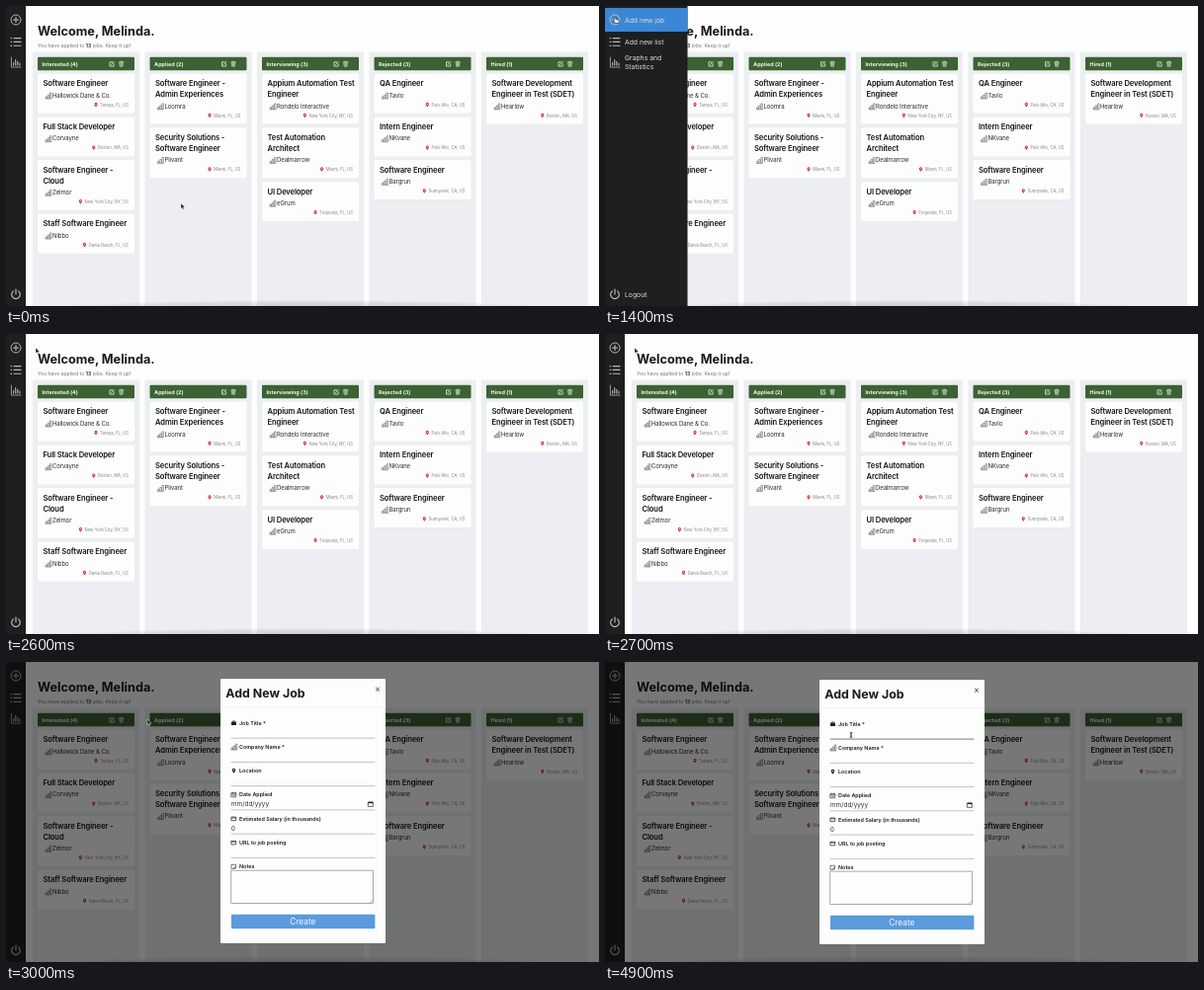
Animation of 600x304 px, one loop 5 s. Source, as an HTML page:

```html
<!DOCTYPE html>
<html lang="en">
<head>
<meta charset="utf-8">
<title>Job board</title>
<style>
  html, body { margin: 0; width: 100%; height: 100%; overflow: hidden; background: #fdfdfd; }
  svg { display: block; }
  text { font-family: Inter, "Open Sans", sans-serif; }
  .title { font-size: 7.6px; font-weight: 600; letter-spacing: -.015em; fill: #151515; }
  .firm { font-size: 6px; letter-spacing: -.015em; fill: #2b2b2b; }
  .place { font-size: 4.2px; fill: #858585; text-anchor: end; }
  .list { font-size: 5.45px; font-weight: 700; fill: #f4f7f3; }
  .menu { font-size: 6.8px; fill: #dedede; }
  .label { font-size: 5.4px; font-weight: 600; fill: #1c1c1c; }
  .line { fill: none; stroke-linecap: round; stroke-linejoin: round; }
</style>
</head>
<body>
<svg id="stage" width="600" height="304" viewBox="0 0 600 304"></svg>
<script>
const LOOP = 5000, STEP = 100;
const SIDE_SHUT = 20, SIDE_OPEN = 83.5;

const lists = [
  ["Interested (4)", [
    [["Software Engineer"], "Hallowick Dane & Co.", "Tampa, FL, US"],
    [["Full Stack Developer"], "Corvayne", "Boston, MA, US"],
    [["Software Engineer -", "Cloud"], "Zelmor", "New York City, NY, US"],
    [["Staff Software Engineer"], "Nibbo", "Dania Beach, FL, US"]]],
  ["Applied (2)", [
    [["Software Engineer -", "Admin Experiences"], "Loomra", "Miami, FL, US"],
    [["Security Solutions -", "Software Engineer"], "Plivant", "Miami, FL, US"]]],
  ["Interviewing (3)", [
    [["Appium Automation Test", "Engineer"], "Rondelo Interactive", "New York City, NY, US"],
    [["Test Automation", "Architect"], "Dealmarrow", "Miami, FL, US"],
    [["UI Developer"], "eGrum", "Tequesta, FL, US"]]],
  ["Rejected (3)", [
    [["QA Engineer"], "Tavlo", "Palo Alto, CA, US"],
    [["Intern Engineer"], "NKvane", "Palo Alto, CA, US"],
    [["Software Engineer"], "Bargrun", "Sunnyvale, CA, US"]]],
  ["Hired (1)", [
    [["Software Development", "Engineer in Test (SDET)"], "Hearlow", "Boston, MA, US"]]]
];

const esc = s => s.replace(/&/g, "&amp;");
const text = (x, y, s, attrs) => `<text x="${x}" y="${y}" ${attrs}>${s}</text>`;
const rect = (x, y, w, h, fill, attrs = "") =>
  `<rect x="${x}" y="${y}" width="${w}" height="${h}" fill="${fill}" ${attrs}/>`;
const line = (d, stroke, width, attrs = "") =>
  `<path class="line" d="${d}" stroke="${stroke}" stroke-width="${width}" ${attrs}/>`;
const at = (x, y, body, attrs = "") => `<g transform="translate(${x} ${y})" ${attrs}>${body}</g>`;

const bars = (x, y, color) => at(x, y,
  line("M0 6V4.2H1.5V6ZM2.2 6V2.3H3.7V6ZM4.4 6V.3H5.9V6Z", color, .55));
const pin = (x, y, color, size = 1) => at(x, y,
  `<path transform="scale(${size})" fill="${color}" fill-rule="evenodd"
    d="M0 4.4C-1 3-1.6 2.3-1.6 1.5a1.6 1.6 0 0 1 3.2 0C1.6 2.3 1 3 0 4.4ZM0 .9a.6.6 0 1 0 0 1.2a.6.6 0 0 0 0-1.2"/>`);

function card(x, y, [titles, firm, place]) {
  const extra = (titles.length - 1) * 10.9;
  return rect(x, y, 98, 40 + extra, "#fdfdfd", 'rx="2"') +
    titles.map((s, i) => text(x + 5.5, y + 12.7 + i * 10.9, s, 'class="title"')).join("") +
    bars(x + 8, y + 19 + extra, "#555") +
    text(x + 15, y + 24 + extra, esc(firm), 'class="firm"') +
    text(x + 92, y + 32.9 + extra, place, 'class="place"');
}

function column([name, cards], i) {
  const x = 27 + i * 113.5;
  let y = 68.7;
  const body = cards.map(c => {
    const out = card(x + 5, y, c);
    y += 43.7 + (c[0].length - 1) * 10.9;
    return out;
  }).join("");
  return rect(x, 46.5, 108, 258, "#eceef1") +
    rect(x + 5, 51.7, 98, 13.5, "#3c6233", 'rx="1"') +
    text(x + 9.6, 60.6, name, 'class="list"') +
    line("M3 .8H.4V5H4.6V2.6M2 3.4L4.8.4", "#e8eee6", .8, `transform="translate(${x + 77.6} 56)"`) +
    line("M0 1H4.6M1.6 .9V.2H3V.9M.6 1.2L.9 5.2H3.7L4 1.2M1.8 2.3V4.1M2.8 2.3V4.1", "#e8eee6", .65,
      `transform="translate(${x + 87.3} 56)"`) + body;
}

const side = rect(0, 0, 84, 304, "#1f1f1f") + rect(0, 2, 84, 24, "#3b87d6", 'id="hover"') +
  `<circle cx="10" cy="14" r="5" fill="none" stroke="#c4c4c4" stroke-width=".9"/>` +
  line("M7.4 14H12.6M10 11.4V16.6", "#c4c4c4", 1) +
  line("M8 32.6H15M8 36.4H15M8 40.2H15", "#b8b8b8", 1.1) +
  line("M5.2 32.6h.4M5.2 36.4h.4M5.2 40.2h.4", "#b8b8b8", 1.4) +
  line("M5.4 52V62H15", "#b8b8b8", .8) +
  line("M7.6 57.5V60M9.7 54.5V60M11.8 56.3V60M13.9 58V60", "#b8b8b8", 1.1) +
  line("M7.4 288.9A4.3 4.3 0 1 0 12.6 288.9M10 287V292", "#c4c4c4", 1.1) +
  [["Add new job", 16.5], ["Add new list", 38.8], ["Graphs and", 54.8],
   ["Statistics", 64.4], ["Logout", 294.6]]
    .map(([s, y]) => text(20, y, s, 'class="menu"')).join("");

// Form icons share a 5 x 5 box.
const ink = "#222";
const cardIcon = line("M.3 .8H4.7V4.4H.3ZM.3 1.7H4.7", ink, .7);
const icons = [
  rect(0, 1.3, 5, 3.4, ink, 'rx=".5"') + line("M1.6 1.2V.5H3.4V1.2", ink, .6),
  bars(0, -.8, "#444"),
  pin(2.5, .2, ink, 1.1),
  line("M.2 .7H4.8V4.9H.2ZM.2 1.9H4.8M1.3 0V.9M3.7 0V.9M1.4 3.3H3.6", ink, .6),
  cardIcon, cardIcon,
  line("M.4 .5H4.6V3.2L3.2 4.6H.4ZM4.6 3.2H3.2V4.6", ink, .6)
];
const fields = ["Job Title *", "Company Name *", "Location", "Date Applied",
  "Estimated Salary (in thousands)", "URL to job posting", "Notes"];

const modal = rect(0, 0, 167, 268, "#fdfdfd", 'rx="1"') +
  text(5.3, 19.1, "Add New Job", 'font-size="12.4" font-weight="700" fill="#1a1a1a"') +
  line("M157.4 9.1L160.6 12.3M160.6 9.1L157.4 12.3", "#333", .9) +
  line("M0 29H167", "#e2e2e2", .6) +
  fields.map((s, i) => {
    const y = 44.8 + i * 24.25;
    return at(11, y - 2.5, icons[i]) + text(19, y + 1.9, s, 'class="label"') +
      (i < 6 ? line(`M11 ${y + 15.4}H156`, "#a9a9a9", .7, i ? "" : 'id="under"') : "");
  }).join("") +
  text(11, 129.5, "mm/dd/yyyy", 'font-size="6.4" fill="#333"') +
  at(149.5, 124.4, line("M.2 .8H4.8V5H.2ZM1.3 0V.8M3.7 0V.8", "#222", .7) + rect(.2, .6, 4.6, 1.2, "#222")) +
  text(11, 153.8, "0", 'font-size="6" fill="#222"') +
  rect(10.8, 194.2, 143.8, 33.4, "#fdfdfd", 'stroke="#858585" stroke-width=".7"') +
  line("M151 226.6L153.7 223.9M152.7 226.6L153.7 225.6", "#777", .4) +
  rect(11, 238.8, 145.4, 14.6, "#5b9bdc", 'rx="1"') +
  text(83.3, 249, "Create", 'font-size="8.4" fill="#f5f9fd" text-anchor="middle"') +
  rect(11.2, 51.5, .6, 7.4, "#222", 'id="caret"');

const cursors =
  `<path id="arrow" d="M0 0V5.4L1.3 4.3L2.2 6.3L3.1 5.9L2.2 4H4Z" fill="#111" stroke="#fff" stroke-width=".4"/>` +
  `<path id="hand" d="M1 0Q1.8 0 1.8 .8V2.5L4.8 3.1Q5.3 3.3 5.2 4L4.7 6.4H1.7L-.4 3.8Q-.3 3 .3 3.5V.8Q.3 0 1 0Z"
    fill="#fff" stroke="#111" stroke-width=".6"/>` +
  line("M-1 -2.6Q0 -2.6 0 -2V2Q0 2.6-1 2.6M1 -2.6Q0 -2.6 0 -2V2Q0 2.6 1 2.6", "#222", .7, 'id="beam"');

stage.innerHTML = `
  <defs><radialGradient id="shade">
    <stop stop-color="#777" stop-opacity=".28"/><stop offset=".75" stop-color="#888" stop-opacity=".16"/>
    <stop offset="1" stop-color="#999" stop-opacity="0"/>
  </radialGradient></defs>` +
  rect(0, 0, 600, 304, "#fdfdfd") +
  text(32, 30, "Welcome, Melinda.", 'font-size="12.7" font-weight="700" fill="#191919"') +
  text(32, 41.6, 'You have applied to <tspan font-weight="700" fill="#333">13</tspan> jobs. Keep it up!',
    'font-size="5.1" fill="#777"') +
  lists.map(column).join("") +
  `<ellipse cx="300" cy="305" rx="240" ry="7" fill="url(#shade)"/>` +
  `<svg id="side" width="20" height="304" overflow="hidden">${side}</svg>` +
  rect(0, 0, 600, 304, "#000", 'id="dim"') +
  `<g id="modal">${modal}</g><g id="cursor">${cursors}</g>`;

const $ = id => document.getElementById(id);

// Pins sit just left of the right-aligned place names.
for (const el of stage.querySelectorAll(".place")) {
  const x = el.getAttribute("x") - el.getComputedTextLength() - 4.2;
  el.insertAdjacentHTML("afterend", pin(x, el.getAttribute("y") - 3.7, "#d3283c"));
}

// Pointer keys: time, x, y, shape.
const path = [
  [0, 177, 200, "arrow"], [100, 172, 191, "arrow"], [200, 172, 191, "arrow"],
  [300, 128, 152, "arrow"], [400, 94, 123, "arrow"], [600, 94, 123, "arrow"],
  [700, 45, 78, "hand"], [800, 45, 78, "hand"], [900, 16, 58, "hand"],
  [1400, 9, 11, "hand"], [1800, 9, 11, "hand"], [2000, 42, 19, "arrow"],
  [2100, 36, 8, "arrow"], [2200, 30, 14, "arrow"], [2800, 30, 14, "arrow"],
  [2900, 74, 13, "arrow"], [3000, 143, 58, "arrow"], [3300, 222, 68, "arrow"],
  [3500, 256, 71, "beam"], [3600, 256, 71, "beam"], [4000, 249, 74, "beam"],
  [LOOP, 249, 74, "beam"]
];

const clamp = v => Math.min(1, Math.max(0, v));
const smooth = v => (v = clamp(v), v * v * (3 - 2 * v));

function pointer(t) {
  const i = path.findIndex(k => k[0] > t) - 1;
  const [t0, x0, y0, shape] = path[i], [t1, x1, y1] = path[i + 1];
  const k = (t - t0) / (t1 - t0);
  return { x: x0 + (x1 - x0) * k, y: y0 + (y1 - y0) * k, shape };
}

function draw(t) {
  const p = pointer(t);
  $("cursor").setAttribute("transform", `translate(${p.x} ${p.y})`);
  for (const id of ["arrow", "hand", "beam"]) $(id).style.display = id === p.shape ? "" : "none";

  const open = smooth((t - 850) / 450) * (1 - smooth((t - 1800) / 200));
  const width = SIDE_SHUT + (SIDE_OPEN - SIDE_SHUT) * open;
  $("side").setAttribute("width", width);
  const row = p.y < 26 ? 0 : p.y < 47 ? 1 : 2;
  $("hover").setAttribute("y", [2, 26, 47][row]);
  $("hover").setAttribute("height", row ? 21 : 24);
  $("hover").style.display = open > 0 && p.x < width ? "" : "none";

  const fade = clamp((t - 2735) / 200);
  const slide = 1 - Math.pow(1 - clamp((t - 2700) / 350), 1.6);
  $("dim").setAttribute("opacity", .53 * clamp((t - 2700) / 100));
  $("modal").setAttribute("opacity", fade);
  $("modal").setAttribute("transform", `translate(217 ${17.9 - 21 * (1 - slide)})`);

  const focus = t >= 4400;
  $("under").setAttribute("stroke", focus ? "#444" : "#a9a9a9");
  $("caret").style.display = focus && t < 4900 ? "" : "none";
}

const start = performance.now();
function tick(now) {
  const t = Math.max(0, now - start) % LOOP;
  draw(Math.floor(t / STEP) * STEP);
  requestAnimationFrame(tick);
}
draw(0);
requestAnimationFrame(tick);
</script>
</body>
</html>
```
